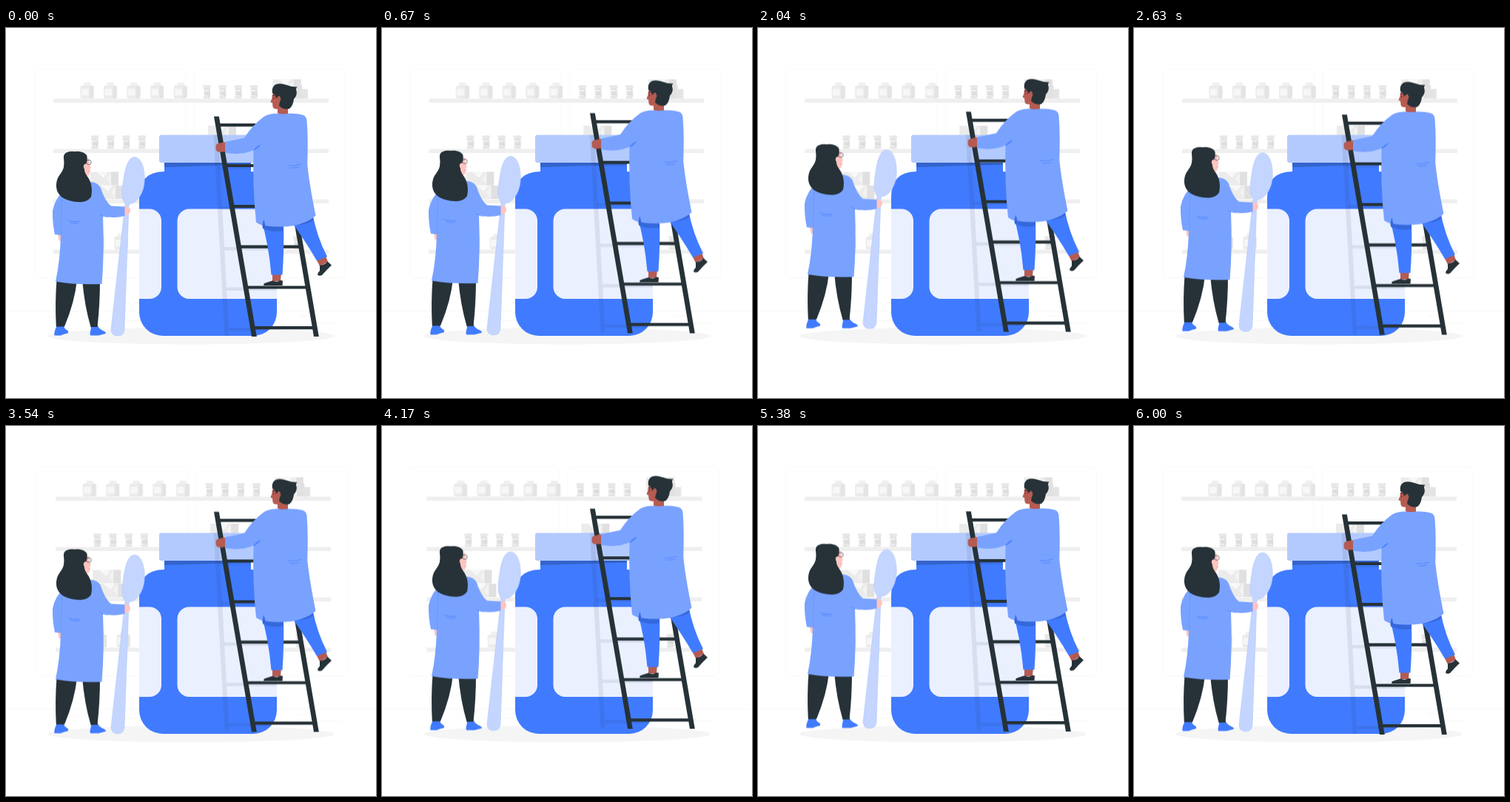
An HTML page for the animation above (6.04 s loop, 500x500 px).

```html
<!DOCTYPE html>
<html lang="en">
<head>
<meta charset="utf-8">
<title>Pharmacists</title>
<style>
  html, body { margin: 0; width: 100%; height: 100%; overflow: hidden; background: #fff; }
  svg { display: block; width: 100%; height: 100%; }
  .shelves, .climber, .woman { animation: 6040ms linear infinite; }
  .shelves { animation-name: shake; }
  .climber { animation-name: climb; }
  .woman { animation-name: hover; }

  /* 600 ms = 9.934% of the loop */
  @keyframes shake {
    0%, 99.338%, 100% { transform: translateX(0); }
    9.934%, 89.404% { transform: translateX(-1px); }
    19.868%, 79.47% { transform: translateX(2px); }
    29.801%, 49.669%, 69.536% { transform: translateX(-4px); }
    39.735%, 59.603% { transform: translateX(4px); }
  }
  @keyframes climb {
    0%, 49.669%, 99.338%, 100% { transform: translateY(0); }
    24.834%, 74.503% { transform: translateY(-10px); }
  }
  /* same float, starting half a second late */
  @keyframes hover {
    0%, 8.278%, 57.947% { transform: translateY(0); }
    33.113%, 82.781% { transform: translateY(-10px); }
    100% { transform: translateY(-3.07px); }
  }
  .blue { fill: #407bff; }
  .coat { fill: #79a2ff; }
  .dark { fill: #263238; }
  .tan { fill: #b55b52; }
  .pink { fill: #ffc4c0; }
  .line { fill: none; stroke: #407bff; stroke-width: .6; stroke-linecap: round; }
</style>
</head>
<body>
<svg viewBox="0 0 500 500">
  <defs>
    <g id="pot">
      <rect x="4.5" y="-21.5" width="9.5" height="4.5" rx=".8" fill="#f0f0f0"/>
      <rect y="-17.5" width="18" height="17.5" rx="3" fill="#ebebeb"/>
      <path d="M13 -17.5H15a3 3 0 0 1 3 3V-3a3 3 0 0 1-3 3H12Z" fill="#e4e4e4"/>
      <rect x="1.5" y="-13" width="9.5" height="9" fill="#f7f7f7"/>
    </g>
    <g id="vial">
      <rect y="-18" width="10.5" height="3.6" rx=".8" fill="#e8e8e8"/>
      <rect x=".8" y="-14.4" width="9" height="14.4" rx="1" fill="#e4e4e4"/>
      <rect x=".8" y="-11" width="6.5" height="8" fill="#f5f5f5"/>
      <rect x="2" y="-9.5" width="7.8" height="5.5" fill="#dedede"/>
    </g>
    <g id="box">
      <path d="M0 -18H38V0H0Z" fill="#ebebeb"/>
      <path d="M28 -18H38V0H28Z" fill="#e0e0e0"/>
      <path d="M8 -18H24L18 -10Z" fill="#f8f8f8"/>
      <path d="M28 -18L22 -9 28 0Z" fill="#f3f3f3"/>
    </g>
    <g id="pots"><use href="#pot"/><use href="#pot" x="31.5"/></g>
    <g id="vials">
      <use href="#vial"/><use href="#vial" x="21.2"/><use href="#vial" x="42.4"/><use href="#vial" x="63.6"/>
    </g>
    <path id="rail" d="M281 119.5H287.8L338.8 417H332Z"/>
    <clipPath id="jar">
      <path d="M210 144.5H336V182H331V194Q366 194 366 229V384A32 32 0 0 1 334 416H212A32 32 0 0 1 180 384V229Q180 194 214 194V182H207V147Z"/>
    </clipPath>
  </defs>

  <g class="shelves">
    <g fill="none" stroke="#ebebeb" stroke-width=".3">
      <rect x="38.8" y="55.2" width="203.8" height="282.5" rx="5.7"/>
      <rect x="254.6" y="55.2" width="203.8" height="282.5" rx="5.7"/>
      <path d="M0 382.5H500M416.8 398.6h33.1M322.5 401.3h8.7M396.6 389.3h19.2M52.5 391h43.2M104.6 391h6.3M131.5 395.2h93.7" stroke="#e6e6e6"/>
    </g>
    <use href="#pots" x="100.5" y="95.2"/>
    <use href="#pots" x="163.5" y="95.2"/>
    <use href="#pot" x="226.7" y="95.2"/>
    <use href="#vials" x="266.2" y="95.2"/>
    <use href="#vials" x="114.8" y="163.3"/>
    <use href="#box" x="362" y="95.2"/>
    <use href="#box" x="360.5" y="87.5"/>
    <rect x="399" y="82.5" width="8.8" height="13" fill="#e4e4e4"/>
    <use href="#box" x="273" y="150"/>
    <use href="#box" x="280" y="163.3"/>
    <use href="#box" x="114" y="212.5"/>
    <use href="#box" x="120" y="231"/>
    <use href="#pots" x="115" y="299.2"/>
    <use href="#vial" x="388" y="299.2"/>
    <path d="M64 98.2H436M64 166.2H436M64 234.2H436M64 302.2H436" stroke="#efefef" stroke-width="5.6"/>
  </g>

  <ellipse cx="250" cy="416.2" rx="193.9" ry="11.3" fill="#f5f5f5"/>

  <!-- medicine jar -->
  <path class="blue" d="M214 180H331V194Q366 194 366 229V384A32 32 0 0 1 334 416H212A32 32 0 0 1 180 384V229Q180 194 214 194Z"/>
  <path d="M214 181H331V184.5L214 188Z" fill="#3363cc"/>
  <rect x="207" y="144.5" width="131" height="37.5" rx="3" fill="#b3caff"/>
  <path d="M180 244.5H194A16 16 0 0 1 210 260.5V350A16 16 0 0 1 194 366H180ZM366 244.5H247.500A16 16 0 0 0 231.500 260.5V350A16 16 0 0 0 247.500 366H366Z" fill="#ebf0ff"/>

  <g clip-path="url(#jar)">
    <g class="climber">
      <path d="M279 119H285.500L301.500 416H295.500L289 296H294.600V296H370V300.500H295L297.500 350.500H370V355H297.800L300.500 405H370V409.500H300.800L301 416H295.500Z" fill="#263238" opacity=".09"/>
      <path d="M286 187.500H340V191.500H286ZM290 241H340V245.500H290Z" fill="#263238" opacity=".09"/>
    </g>
  </g>

  <g class="climber">
    <!-- ladder -->
    <use href="#rail" class="dark" x="84"/>
    <path d="M286 131.200H345M296 186H345M305 241H350M314 295.700H400M323 350.500H408M333 405.200H417" stroke="#263238" stroke-width="4.200"/>
    <use href="#rail" class="dark"/>

    <!-- legs and shoes -->
    <path class="tan" d="M360 330H372L371 342H360ZM420 314L432 308 435 316 424 322Z"/>
    <path class="dark" d="M360 341.500Q366 344 371 341L374 341.500 373.500 348H348.500Q347 345 352 344ZM424 321Q431 320 434.500 315.500L440 320.500Q433 327 427.500 333.500Q424 336 421 333.500Q421 331 424 328Z"/>
    <path class="blue" d="M344.500 257L375 262Q376 300 373.500 333.500H358.500Q355 292 344.500 257ZM383 258L414 250Q420 282 434 309L420 314.500Q406 290 383 258Z"/>
    <path d="M345 259L375 263V274Q360 277 347 271ZM384 260L414 253 415.500 260Q404 267 388 266Z" fill="#3568dc"/>

    <!-- head -->
    <path class="tan" d="M362 85Q359 92 359.500 95L357.500 99.500Q358 101 360 101L360.500 106Q361 110 367 109.500V115Q372 119 381 116V106L378 84Z"/>
    <path class="dark" d="M360 88Q358.500 79 365 76Q371 74 379 77Q387 80 393.500 79.500Q391.500 82 392 83.500Q394.500 90 389 96Q388 105 383 109Q375 111 369 105L370.500 97Q371.500 91 368 92Q366 96 364.500 95Q365 90 360 88Z"/>
    <path class="tan" d="M364.500 99Q363.500 94 368.500 93Q373 94 370.500 99Q368 104 365 102Z"/>
    <path d="M360.300 91.500L363.500 91.200" stroke="#263238" stroke-width="1" fill="none"/>
    <ellipse class="dark" cx="361.500" cy="95" rx=".6" ry="1"/>

    <!-- hand and coat -->
    <path class="tan" d="M297 154L289 155.500Q284 156 283.500 159.500L283.800 165Q286 168.500 291 167.500L298 167Z"/>
    <path class="coat" d="M349 119.500Q356 115.500 367 115.500Q374 117 382 115.500Q393 115 401 117.500Q406 119 406.500 125Q408.500 150 407.200 184Q410 212 418.500 253.500Q402 268 372 268.500Q359 268.500 350.500 267L348.300 258.500 346.500 266.500Q341 265 338 262.500Q333 215 334.500 165Q318 172.500 296 168.500V154L322 148.500Q333 131 349 119.500Z"/>
    <path d="M334.500 166Q341 163 344.500 157Q336 161 334.500 166Z" fill="#4d83ff"/>
    <path class="line" d="M381 186Q390 187 398.500 184M384 189Q391 189.500 396 188"/>
  </g>

  <g class="woman">
    <!-- legs and shoes -->
    <path class="blue" d="M68 401H77.500Q78 406 83.500 409Q85 411 83.500 412.500Q78 413.500 74 415.500H65.500Q64.500 411 68 404ZM114.500 401H123.500Q125 407 133 410Q136 412 134.500 413Q130 414 125 415.500H114Q113 413 114 410Q115.500 406 114.500 401Z"/>
    <path class="dark" d="M68.500 340H96Q93 370 79 403.500H67.800Q66 372 68.500 340ZM103 340H127Q127 373 123.500 404H114.500Q106 375 103 340Z"/>

    <path d="M174 174.500C184 175 188.500 193 187 209C185.500 225 176 237.500 167 237.500L166 240 160 407Q159.500 416 151 416Q142 416 142 407L161 237C155 231 157 216 159 204C161 190 165 174 174 174.500Z" fill="#c4d5ff" stroke="#a9c2fb" stroke-width=".5"/>

    <!-- hands and face -->
    <path class="pink" d="M70 277H75L74.500 286Q73 289 71.500 287ZM159 242L163 241Q167 242 168 245.500Q168.500 250 164 252.500L159 254Z"/>
    <path class="pink" d="M104 176H112Q113.500 181 113.200 185L115 188.500 113.500 190Q114 196 111.500 199Q110 200.500 107.500 200V210H98Z"/>

    <!-- coat -->
    <path class="coat" d="M80 218Q92 207 115 208Q124 209 127.500 215Q134 235 142 240.500L160.500 241.500V254Q145 258 131 254Q133 305 129.500 346Q95 347.500 67 342.500Q73 315 74 280L66 279Q62.500 262 63 247Q66 230 80 218Z"/>
    <path d="M76 229Q74.500 260 74.800 279" fill="none" stroke="#5f90ff" stroke-width=".6"/>
    <path class="line" d="M84 260Q91 262.500 100 261.500M87 263Q92 264.300 98 263.800"/>
    <path d="M127 252Q131 255.500 137 255.500" class="line"/>

    <!-- hair and glasses -->
    <path class="dark" d="M78 176C77 168 85 166 93 167C101 166 108 169 109.500 173Q110.500 178 108.500 182C104 189 106 195 109.500 200C115 207 117.500 217 115 228C109 237 97 236 87 233.500C75 231 67 223 68 211C69 199 76 197 78 188Q79 182 78 176Z"/>
    <path class="pink" d="M108 184Q105 183 104.800 187.500Q105.500 192 109 191.500Z"/>
    <circle cx="112" cy="181.500" r="3.200" fill="none" stroke="#263238" stroke-width=".6"/>
    <path d="M109 182.500L105 184" stroke="#263238" stroke-width=".6"/>
    <path d="M111.500 193.500Q113 194 113.800 193" fill="none" stroke="#d98a86" stroke-width=".6"/>
  </g>
</svg>
</body>
</html>
```
